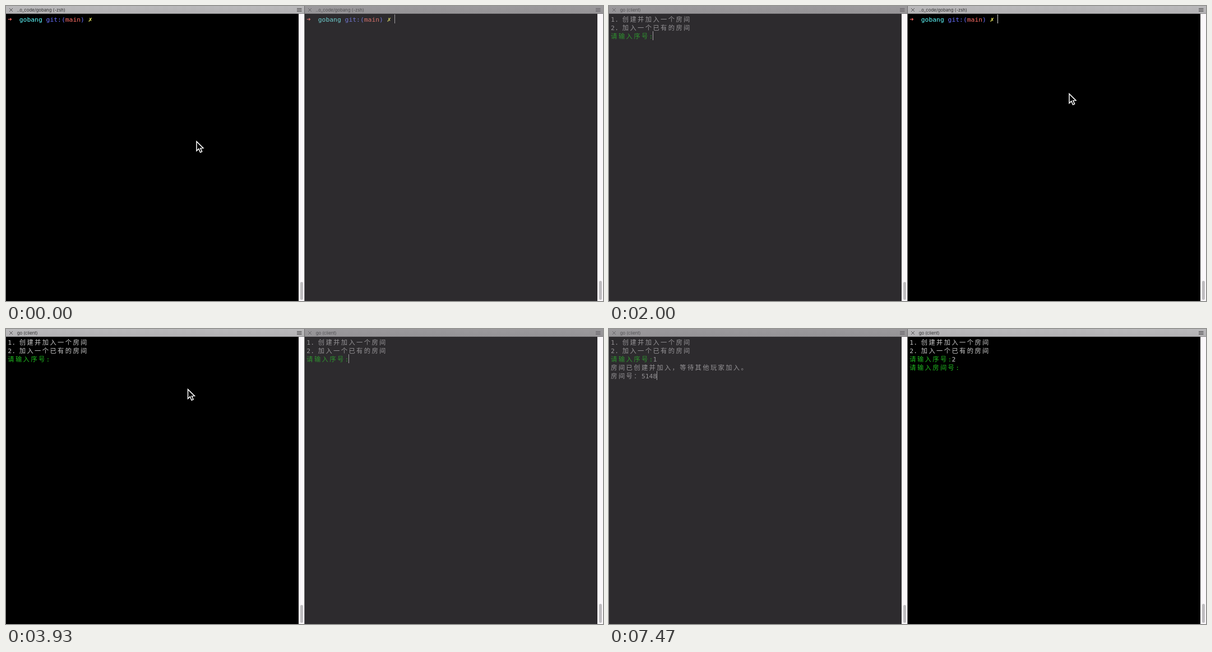
Write an HTML page with a canvas that moves like this. It is 1065 px wide and 526 px high and loops after 8000 ms.

```html
<!DOCTYPE html>
<html lang="zh">
<head>
<meta charset="utf-8">
<title>Two terminal panes</title>
<style>
html, body { margin: 0; width: 100%; height: 100%; overflow: hidden; background: #000; }
canvas { display: block; width: 1065px; height: 526px; }
</style>
</head>
<body>
<canvas id="stage" width="1065" height="526"></canvas>
<script>
const ctx = document.getElementById('stage').getContext('2d');
const LOOP = 8000, CELL = 6.83, ROW = 15;
const MONO = '11.35px "DejaVu Sans Mono", monospace';
const BOLD = 'bold 12px "DejaVu Sans Mono", "DejaVu Sans", monospace';
const CJK = '300 11.3px "Noto Sans CJK SC", "Noto Sans CJK", sans-serif';
const TITLE = '7.75px Inter, sans-serif';

const LIT = { bg: '#000', text: '#c7c7c7', green: '#1fb81f', red: '#ff6e67', cyan: '#5ffdff',
  blue: '#6871ff', yellow: '#fffc67', caret: '#d8d8d8' };
const DIM = { bg: '#2d2b2e', text: '#959396', green: '#2f932f', red: '#d5716b', cyan: '#6fcdce',
  blue: '#7176cf', yellow: '#d6d468', caret: '#a09ea1' };

const COMMAND = 'go run client.go';
const PROMPT = [['➜', 'red'], ['  gobang', 'cyan'], [' git:(', 'blue'], ['main', 'red'],
  [')', 'blue'], [' ✗ ', 'yellow']];
const MENU = [[['1. 创建并加入一个房间', 'text']], [['2. 加入一个已有的房间', 'text']]];
const ask = (label, answer = '') => [[label, 'green'], [answer, 'text']];
const shell = (typed = '') => [[...PROMPT, [typed, 'text']]];
const menu = (answer, ...more) => [...MENU, ask('请输入序号:', answer), ...more];

// Each track holds [start time, value] pairs; the latest started one applies.
const at = (track, t) => track.filter(k => k[0] <= t).pop()[1];

const HOME = '..o_code/gobang (-zsh)', CLIENT = 'go (client)';
const panes = [
  {
    x: 0, thumb: 492,
    title: [[0, HOME], [800, 'go (go)'], [1330, 'go (link)'], [2000, CLIENT]],
    lines: [
      [0, shell()], [200, shell(COMMAND)], [730, [...shell(COMMAND), []]],
      [1330, menu()], [4400, menu('1')],
      [4670, menu('1', [['房间已创建并加入，等待其他玩家加入。', 'text']], [['房间号：5148', 'text']])]
    ],
    caret: [[0, false], [130, true], [3930, false], [4270, true]]
  },
  {
    x: 533, thumb: 490,
    title: [[0, HOME], [2870, 'go (go)'], [3530, CLIENT]],
    lines: [
      [0, shell()], [2470, shell(COMMAND)], [2870, [...shell(COMMAND), []]],
      [3200, menu()], [6670, menu('2')], [6930, menu('2', ask('请输入房间号:'))]
    ],
    caret: [[0, true], [2330, false], [2470, true], [5800, false], [6000, true],
      [6470, false], [6670, true], [7470, false]]
  }
];
const tabFocus = [[0, 0], [1930, 1], [3870, 0], [5600, 1]];
const paneFocus = [[0, 0], [2000, 1], [3930, 0], [5670, 1]];

// Pointer is shown between start and end, gliding in equal steps to its rest point.
const glides = [
  { start: 0, end: 200, steps: 0, from: [339, 240], to: [339, 240], over: 0 },
  { start: 1330, end: 2470, steps: 6, from: [339, 243], to: [820, 155], over: 0.9 },
  { start: 3470, end: 4400, steps: 3, from: [744, 171], to: [323.5, 106], over: 0 },
  { start: 5200, end: 6670, steps: 3, from: [403, 144], to: [700, 136], over: 0 }
];

function rect(x, y, w, h, color) {
  ctx.fillStyle = color;
  ctx.fillRect(x, y, w, h);
}

function path(points, color, width) {
  ctx.beginPath();
  points.forEach(([x, y]) => ctx.lineTo(x, y));
  ctx.strokeStyle = color;
  ctx.lineWidth = width;
  ctx.stroke();
}

// Draws one row on the cell grid and returns the x where it ends.
function drawLine(line, x, y, colors) {
  for (const [text, tone] of line) {
    ctx.fillStyle = colors[tone];
    for (const ch of text) {
      const wide = ch >= '\u3000', symbol = ch === '➜' || ch === '✗';
      ctx.font = wide ? CJK : symbol ? BOLD : MONO;
      ctx.fillText(ch, x, y);
      x += wide ? CELL * 2 : CELL;
    }
  }
  return x;
}

function drawTab(x, title, active) {
  const shade = ctx.createLinearGradient(0, 0, 0, 13);
  shade.addColorStop(0, active ? '#bab9bb' : '#9b999c');
  shade.addColorStop(1, active ? '#b3b2b4' : '#969497');
  rect(x, 0, 533, 13, shade);
  rect(x, 13, 533, 1, active ? '#8c8b8d' : '#7b797c');
  const ink = active ? '#4b4a4c' : '#646266';
  path([[x + 6, 4], [x + 12, 10]], ink, 0.9);
  path([[x + 12, 4], [x + 6, 10]], ink, 0.9);
  for (let y = 4.5; y < 10; y += 2.5) path([[x + 519, y], [x + 527.5, y]], ink, 1.1);
  ctx.font = TITLE;
  ctx.fillStyle = active ? '#303031' : '#515053';
  ctx.fillText(title, x + 19.7, 9.7);
}

function drawPane(pane, index, t) {
  const colors = at(paneFocus, t) === index ? LIT : DIM;
  const { x } = pane;
  rect(x, 14, 522, 512, colors.bg);
  rect(x + 522, 14, 10, 512, '#fbf8fb');
  ctx.fillStyle = '#bfbdc0';
  ctx.beginPath();
  ctx.roundRect(x + 525, pane.thumb, 5, 524 - pane.thumb, 2.5);
  ctx.fill();
  let end = 0, row = 0;
  for (const line of at(pane.lines, t)) {
    end = drawLine(line, x + 3.3, 27.6 + row * ROW, colors);
    row++;
  }
  if (at(pane.caret, t)) rect(Math.round(end - 0.4), row * ROW, 1, 16, colors.caret);
  drawTab(x, at(pane.title, t), at(tabFocus, t) === index);
}

function drawPointer(t) {
  const g = glides.find(k => t >= k.start && t < k.end);
  if (!g) return;
  const step = Math.floor((t - g.start + 4) / 66.7);
  const p = g.steps ? Math.min(1, step / g.steps) : 1;
  const q = p - 1, ease = 1 + (g.over + 1) * q ** 3 + g.over * q ** 2;
  const [x, y] = g.from.map((a, i) => a + (g.to[i] - a) * ease);
  ctx.save();
  ctx.translate(x + 1, y + 1.6);
  ctx.beginPath();
  [[0, 0], [0, 16.6], [3.8, 13], [6.6, 19.4], [9.6, 18.1], [6.9, 12], [11.9, 11.8]]
    .forEach(([a, b]) => ctx.lineTo(a, b));
  ctx.closePath();
  ctx.fillStyle = '#000';
  ctx.fill();
  ctx.strokeStyle = '#fff';
  ctx.lineWidth = 1.5;
  ctx.stroke();
  ctx.restore();
}

function frame() {
  const t = performance.now() % LOOP;
  rect(0, 0, 1065, 526, '#3a383b');
  panes.forEach((pane, i) => drawPane(pane, i, t));
  rect(532, 0, 1, 526, '#6b696c');
  drawPointer(t);
  requestAnimationFrame(frame);
}
frame();
</script>
</body>
</html>
```
